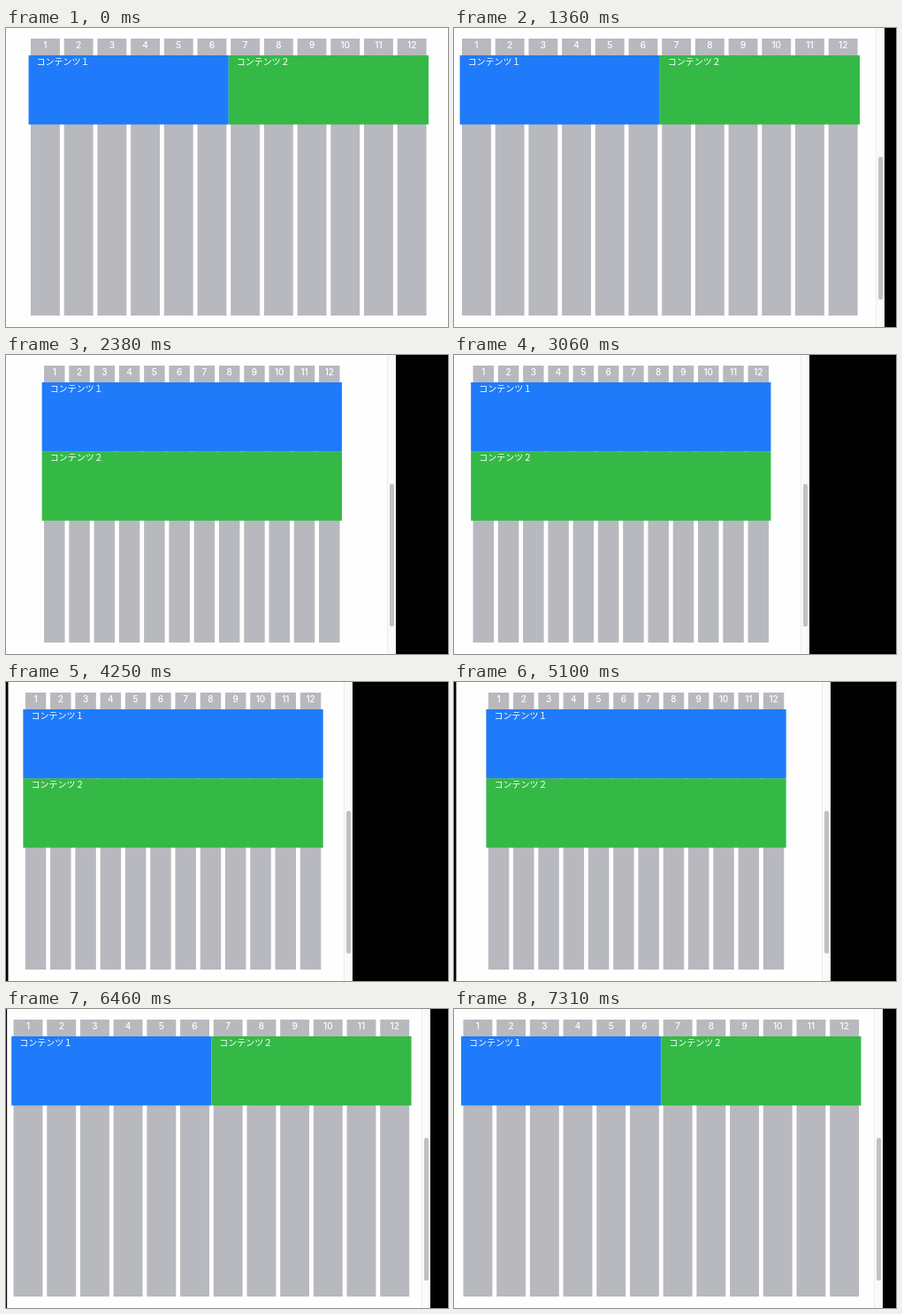
These frames come from a looping animation (500 by 339 pixels, 8.67 s). An HTML page with a canvas:

```html
<!DOCTYPE html>
<html lang="ja">
<head>
<meta charset="utf-8">
<title>Responsive grid</title>
<style>
  html, body { margin: 0; width: 100%; height: 100%; overflow: hidden; background: #fefefe; }
  canvas { display: block; }
</style>
</head>
<body>
<canvas id="stage" width="500" height="339"></canvas>
<script>
const ctx = document.getElementById('stage').getContext('2d');
const WIDTH = 500, HEIGHT = 339;
const LOOP = 8670, STEP = 170;
const COLUMNS = 12, GUTTER = 2.4;
const BREAKPOINT = 470, WIDE = 452.4, NARROW = 339.3;
const ROW_TOP = 31, ROW_HEIGHT = 78.4;

// [step, left window edge, right window edge]
const keys = [
  [4, -5, 525], [8, -5, 487], [11, -5, 456], [14, -4, 441],
  [18, -8, 402], [22, -8, 391], [23, -8, 391], [25, 2.5, 392],
  [30, 2.5, 426], [31, 2, 439], [32, 2, 439], [35, 1.5, 471],
  [39, 1, 483], [43, 0, 485]
];

function windowEdges(step) {
  const next = keys.findIndex(key => key[0] >= step);
  if (next === 0) return keys[0].slice(1);
  if (next < 0) return keys[keys.length - 1].slice(1);
  const a = keys[next - 1], b = keys[next];
  const p = (step - a[0]) / (b[0] - a[0]);
  return [1, 2].map(i => a[i] + (b[i] - a[i]) * p);
}

function rect(x, y, w, h, color) {
  ctx.fillStyle = color;
  ctx.fillRect(x, y, w, h);
}

function drawColumns(x, width) {
  const pitch = width / COLUMNS;
  ctx.font = '500 10px Inter, Roboto, sans-serif';
  ctx.textAlign = 'center';
  for (let i = 0; i < COLUMNS; i++) {
    const left = x + i * pitch;
    rect(left + GUTTER, 12, pitch - 2 * GUTTER, 314, '#b8b9be');
    ctx.fillStyle = '#fff';
    ctx.fillText(i + 1, left + pitch / 2, 23.3);
  }
}

function drawContent(x, y, width, color, label) {
  rect(x, y, width, ROW_HEIGHT, color);
  ctx.font = '10px "Noto Sans CJK JP", "Noto Sans CJK", sans-serif';
  ctx.textAlign = 'left';
  ctx.fillStyle = '#fff';
  ctx.fillText(label, x + 9, y + 10.8);
}

function drawScrollbar(right) {
  rect(right - 10, 0, 10, HEIGHT, '#fafafa');
  rect(right - 10, 0, 1, HEIGHT, '#ececec');
  ctx.fillStyle = '#c1c1c1';
  ctx.beginPath();
  ctx.roundRect(right - 7, 146, 5, 162, 2.5);
  ctx.fill();
}

function draw(time) {
  const [left, right] = windowEdges(Math.floor((time % LOOP) / STEP));
  const wide = right - left > BREAKPOINT;
  const width = wide ? WIDE : NARROW;
  const x = (left + right - 10) / 2 - 3.2 - width / 2;

  rect(0, 0, WIDTH, HEIGHT, '#000');
  rect(left, 0, right - left, HEIGHT, '#fefefe');
  drawColumns(x, width);

  const boxWidth = wide ? width / 2 : width;
  drawContent(x, ROW_TOP, boxWidth, '#1f7bf9', 'コンテンツ１');
  if (wide) drawContent(x + boxWidth, ROW_TOP, boxWidth, '#34b947', 'コンテンツ２');
  else drawContent(x, ROW_TOP + ROW_HEIGHT, boxWidth, '#34b947', 'コンテンツ２');
  drawScrollbar(right);
}

const start = performance.now();
function tick() {
  draw(performance.now() - start);
  requestAnimationFrame(tick);
}
tick();
</script>
</body>
</html>
```
